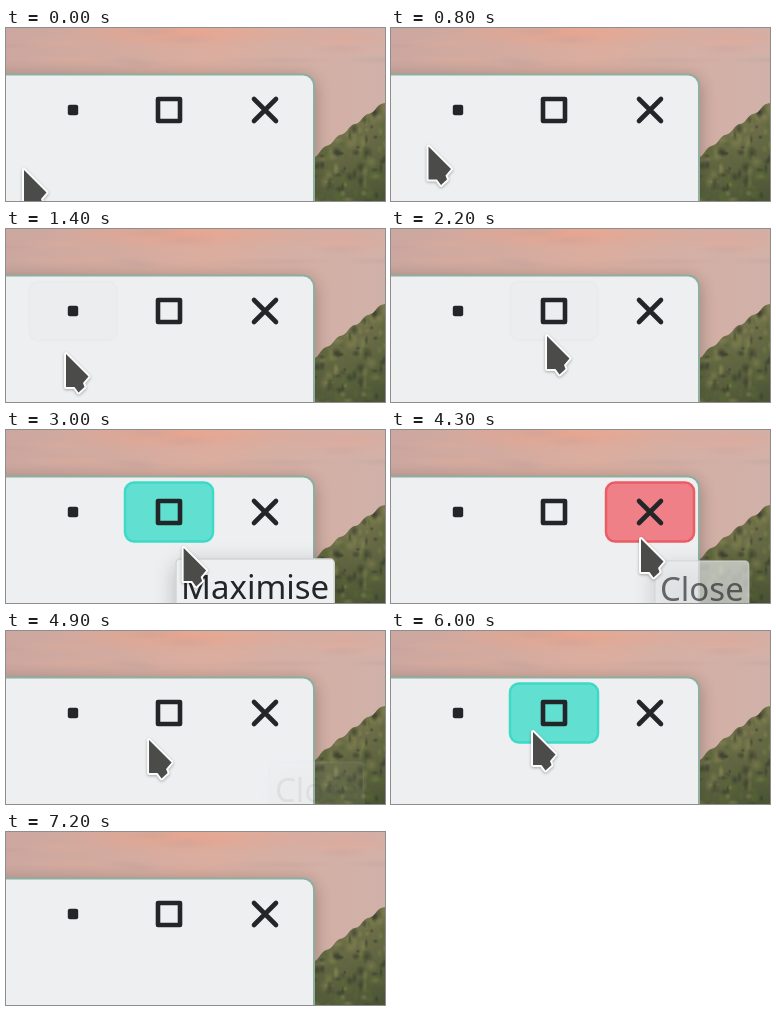
Write an HTML page with a canvas that moves like this. It is 379 by 173 pixels and loops after 7500 ms.

```html
<!DOCTYPE html>
<html lang="en">
<head>
<meta charset="utf-8">
<title>Title bar buttons</title>
<style>
html, body { margin: 0; width: 100%; height: 100%; overflow: hidden; }
canvas { display: block; }
</style>
</head>
<body>
<canvas id="stage" width="379" height="173"></canvas>
<script>
const W = 379, H = 173, LOOP = 7500, STEP = 100;
const ctx = document.getElementById('stage').getContext('2d');
const INK = '#232629', PANEL = '#eeeff1';
const TEAL = { hue: 173, sat: 67, light: 63 };
const RED = { hue: 356, sat: 78, light: 72 };
const MIN_X = 67, MAX_X = 163, CLOSE_X = 259;

// Resting points, and the arcs that lead from one to the next.
const ENTRY = [18, 141], ON_MIN = [56, 97], ON_MAX = [156, 106];
const ON_CLOSE = [250, 108], BACK = [142, 100], EXIT = [-40, 90];
const moves = [
  { on: 500, off: 1100, from: ENTRY, bend: [38, 116], to: ON_MIN },
  { on: 1200, off: 2200, from: ON_MIN, bend: [56, 180], to: ON_MAX },
  { on: 2900, off: 3900, from: ON_MAX, bend: [271, 167], to: ON_CLOSE },
  { on: 4400, off: 5100, from: ON_CLOSE, bend: [123, 118], to: BACK },
  { on: 6000, off: 6800, from: BACK, bend: [98, 171], to: EXIT }
];

const hovers = [
  { x: MIN_X, color: TEAL, on: 900, off: 1205 },
  { x: MAX_X, color: TEAL, on: 2195, off: 3000 },
  { x: CLOSE_X, color: RED, on: 3650, off: 4450 },
  { x: MAX_X, color: TEAL, on: 4900, off: 6000 }
];

const tips = [
  { text: 'Maximise', on: 2700, off: 3245 },
  { text: 'Close', on: 4100, off: 4620 },
  { text: 'Maximise', on: 5300, off: 5500 }
];

const clamp = v => Math.min(1, Math.max(0, v));

// Rises after `on` and falls after `off`, each over `span` ms.
const fade = ({ on, off }, t, span) => clamp(Math.min(t - on, off + span - t) / span);

function pointerAt(t) {
  const { on, off, from, bend, to } = moves.findLast(m => m.on <= t) || moves[0];
  const u = clamp((t - on) / (off - on)), v = 1 - u;
  return from.map((a, i) => v * v * a + 2 * u * v * bend[i] + u * u * to[i]);
}

function seeded(seed) {
  return () => (seed = (seed * 16807) % 2147483647) / 2147483647;
}

function box(c, x, y, w, h, r) {
  c.beginPath();
  c.roundRect(x, y, w, h, r);
}

function blob(c, x, y, rx, ry, rgb, alpha) {
  c.save();
  c.translate(x, y);
  c.scale(rx, ry);
  const g = c.createRadialGradient(0, 0, 0, 0, 0, 1);
  g.addColorStop(0, `rgba(${rgb},${alpha})`);
  g.addColorStop(1, `rgba(${rgb},0)`);
  c.fillStyle = g;
  c.fillRect(-1, -1, 2, 2);
  c.restore();
}

function sky(c) {
  const g = c.createLinearGradient(0, 0, W, 0);
  g.addColorStop(0, '#cba79f');
  g.addColorStop(.5, '#daad9f');
  g.addColorStop(1, '#d0b1a9');
  c.fillStyle = g;
  c.fillRect(0, 0, W, H);
  blob(c, 180, 5, 130, 16, '240,160,132', .6);
  blob(c, 340, 8, 80, 14, '226,166,150', .5);
  const rnd = seeded(11);
  for (let i = 0; i < 16; i++) {
    blob(c, rnd() * W, rnd() * 40, 25 + rnd() * 40, 3 + rnd() * 4,
      i % 2 ? '228,172,154' : '190,160,156', .35);
  }
}

function hill(c) {
  const ridge = x => 132 - 58 * Math.pow((x - 305) / 74, .92) + 1.2 * Math.sin(x * .45);
  c.save();
  c.beginPath();
  c.moveTo(W, H);
  c.lineTo(300, H);
  for (let x = 305; x <= W; x += 2) c.lineTo(x, ridge(x));
  c.closePath();
  const g = c.createLinearGradient(335, 95, 365, H);
  g.addColorStop(0, '#74734c');
  g.addColorStop(1, '#4b5535');
  c.fillStyle = g;
  c.fill();
  c.clip();
  const rnd = seeded(5), tones = ['48,54,40', '132,132,80', '88,104,52'];
  for (let i = 0; i < 150; i++) {
    const x = 305 + rnd() * 74;
    blob(c, x, ridge(x) + rnd() * 95, 2 + rnd() * 5, 2 + rnd() * 6, tones[i % 3], .6);
  }
  c.restore();
}

function windowPanel(c) {
  c.save();
  c.shadowColor = 'rgba(45,45,40,.36)';
  c.shadowBlur = 18;
  c.shadowOffsetY = 4;
  c.fillStyle = '#8fae9f';
  box(c, -30, 45.5, 339, 200, 12);
  c.fill();
  c.restore();
  c.fillStyle = PANEL;
  box(c, -30, 47.5, 337, 200, 10);
  c.fill();
}

const backdrop = document.createElement('canvas');
backdrop.width = W;
backdrop.height = H;
[sky, hill, windowPanel].forEach(draw => draw(backdrop.getContext('2d')));

// The tint starts out grey and gains its colour as it fades in.
function highlight(hover, t) {
  const p = fade(hover, t, 200), { hue, sat, light } = hover.color;
  if (!p) return;
  ctx.globalAlpha = p;
  box(ctx, hover.x - 44, 52.5, 88, 59, 9);
  ctx.fillStyle = `hsl(${hue}, ${sat * p}%, ${light}%)`;
  ctx.fill();
  ctx.strokeStyle = `hsl(${hue}, ${sat * p}%, ${light - 8}%)`;
  ctx.lineWidth = 2.5;
  ctx.stroke();
  ctx.globalAlpha = 1;
}

function icons() {
  const y = 82, r = 11;
  ctx.fillStyle = ctx.strokeStyle = INK;
  ctx.lineWidth = 4.6;
  ctx.lineCap = ctx.lineJoin = 'round';
  box(ctx, MIN_X - 5.2, y - 5.2, 10.4, 10.4, 2);
  ctx.fill();
  ctx.strokeRect(MAX_X - r, y - r, 2 * r, 2 * r);
  ctx.beginPath();
  for (const s of [-1, 1]) {
    ctx.moveTo(CLOSE_X - r, y - s * r);
    ctx.lineTo(CLOSE_X + r, y + s * r);
  }
  ctx.stroke();
}

function tooltip(tip, t) {
  const alpha = fade(tip, t, 300);
  if (!alpha) return;
  const [px, py] = pointerAt(tip.on), x = px + 14, y = py + 23;
  ctx.save();
  ctx.globalAlpha = alpha;
  ctx.font = '33px "Noto Sans", sans-serif';
  ctx.shadowColor = 'rgba(0,0,0,.25)';
  ctx.shadowBlur = 22;
  ctx.shadowOffsetY = 6;
  ctx.fillStyle = PANEL;
  box(ctx, x, y, ctx.measureText(tip.text).width + 10, 54, 4);
  ctx.fill();
  ctx.shadowColor = 'transparent';
  ctx.strokeStyle = '#d2d5d6';
  ctx.lineWidth = 1.5;
  ctx.stroke();
  ctx.fillStyle = INK;
  ctx.fillText(tip.text, x + 5, y + 40);
  ctx.restore();
}

function arrow([x, y]) {
  ctx.save();
  ctx.translate(x, y + 1);
  ctx.lineJoin = 'round';
  const shape = new Path2D('M0 0 L22.5 22.5 L17 29 L18.5 33 L12.5 38.5 L8.5 33 L0 33 Z');
  ctx.shadowColor = 'rgba(0,0,0,.3)';
  ctx.shadowBlur = 3;
  ctx.shadowOffsetY = 1;
  ctx.strokeStyle = '#fcfcfc';
  ctx.lineWidth = 4;
  ctx.stroke(shape);
  ctx.shadowColor = 'transparent';
  ctx.fillStyle = '#4b4b4a';
  ctx.fill(shape);
  ctx.restore();
}

function render(now) {
  const t = Math.floor((now % LOOP) / STEP) * STEP;
  ctx.drawImage(backdrop, 0, 0);
  hovers.forEach(h => highlight(h, t));
  icons();
  tips.forEach(tip => tooltip(tip, t));
  arrow(pointerAt(t));
}

let start;
function tick(now) {
  start ??= now;
  render(Math.max(0, now - start));
  requestAnimationFrame(tick);
}
render(0);
requestAnimationFrame(tick);
</script>
</body>
</html>
```
